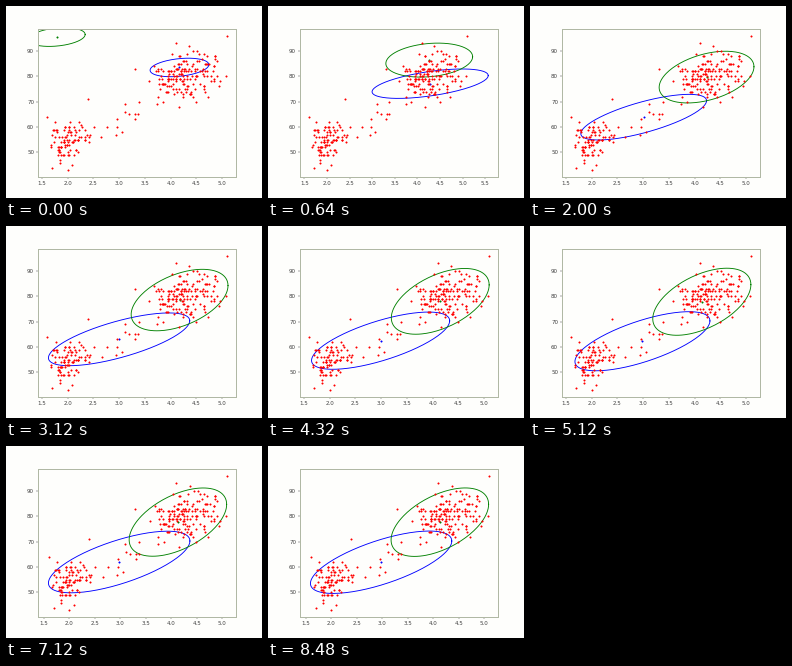
These frames come from a looping animation (256 by 192 pixels, 8.56 s). A matplotlib script:

```python
import matplotlib.pyplot as plt
import numpy as np
from matplotlib.animation import FuncAnimation

FRAMES = 107
STEP = 80
SPREAD, SPLIT, LAST = 8, 25, FRAMES - 1
PAPER, FRAME_COLOR, INK = "#fefefc", "#b0b8a4", "0.25"

# Centre x, centre y, half width, half height, tilt:
# at the start, spread out, split apart and settled
BLUE = np.array([
    (4.17, 83.5, 0.57, 3.65, 0.30),
    (4.28, 77.1, 1.285, 5.8, 0.55),
    (3.01, 63.9, 1.22, 9.0, 0.72),
    (2.98, 61.9, 1.384, 12.3, 0.68),
])
GREEN = np.array([
    (1.79, 95.5, 0.55, 3.7, 0.27),
    (4.26, 86.4, 0.96, 6.7, 0.20),
    (4.23, 79.7, 0.92, 10.2, 0.40),
    (4.13, 77.7, 0.955, 13.5, 0.52),
])


def settle(s, rate):
    """Exponential approach from 0 to 1."""
    return (1 - np.exp(-rate * s)) / (1 - np.exp(-rate))


def pose(poses, frame, rate, wobble):
    start, spread, split, end = poses
    if frame < SPREAD:
        return start + (spread - start) * frame / SPREAD
    if frame < SPLIT:
        s = (frame - SPREAD) / (SPLIT - SPREAD)
        return spread + (split - spread) * s * (2 - s)
    s = (frame - SPLIT) / (LAST - SPLIT)
    p = split + (end - split) * settle(s, rate)
    # The width swings around its trend and calms down
    p[2] += wobble * (1 - s) * np.sin(2 * np.pi * (frame - SPLIT) / 60)
    return p


def outline(cx, cy, hw, hh, tilt):
    a = np.linspace(0, 2 * np.pi, 181)
    return cx + hw * np.cos(a), cy + hh * np.sin(a + np.arcsin(tilt))


def cluster(rng, n, mean, sd, corr):
    """Correlated normal points without far outliers."""
    u = rng.standard_normal((n * 2, 2))
    u = u[np.hypot(u[:, 0], u[:, 1]) < 2.2][:n]
    x = mean[0] + sd[0] * u[:, 0]
    y = mean[1] + sd[1] * (corr * u[:, 0] + np.sqrt(1 - corr**2) * u[:, 1])
    return np.column_stack([np.clip(x, 1.6, 5.1), y.round()])


def padded(a, b):
    pad = 0.05 * (b - a)
    return a - pad, b + pad


rng = np.random.default_rng(4)
points = np.vstack([
    cluster(rng, 92, (2.0, 53.8), (0.20, 5.4), 0.25),
    cluster(rng, 160, (4.32, 80.3), (0.37, 5.6), 0.25),
    cluster(rng, 16, (3.1, 64.5), (0.42, 5.0), 0.6),
    [(1.6, 64), (2.0, 43), (2.4, 71), (3.3, 83), (4.1, 93), (5.1, 96)],
])
low, high = points.min(axis=0), points.max(axis=0)

fig, ax = plt.subplots(figsize=(6.4, 4.8), dpi=40, facecolor=PAPER)
ax.set_facecolor(PAPER)
ax.spines[:].set(color=FRAME_COLOR, linewidth=1.8)
ax.tick_params(color=INK, labelcolor=INK)
ax.set_ylim(padded(low[1], high[1]))
ax.plot(points[:, 0], points[:, 1], "r.", ms=5, zorder=3)

shapes = []
for poses, color, rate, wobble in ((BLUE, "b", 3, 0.1), (GREEN, "g", 5, 0)):
    ring, = ax.plot([], [], color=color, lw=1.6, zorder=1)
    dot, = ax.plot([], [], ".", color=color, ms=5, zorder=2)
    shapes.append((poses, rate, wobble, ring, dot))


def update(frame):
    for poses, rate, wobble, ring, dot in shapes:
        p = pose(poses, frame, rate, wobble)
        ring.set_data(*outline(*p))
        dot.set_data([p[0]], [p[1]])
        if poses is BLUE:
            # The view keeps the data and the blue ellipse inside
            left, right = p[0] - 1.02 * p[2], p[0] + 1.02 * p[2]
            ax.set_xlim(padded(min(low[0], left), max(high[0], right)))


anim = FuncAnimation(fig, update, frames=FRAMES, interval=STEP,
                     repeat=True, repeat_delay=0, blit=False)
plt.show()
```
